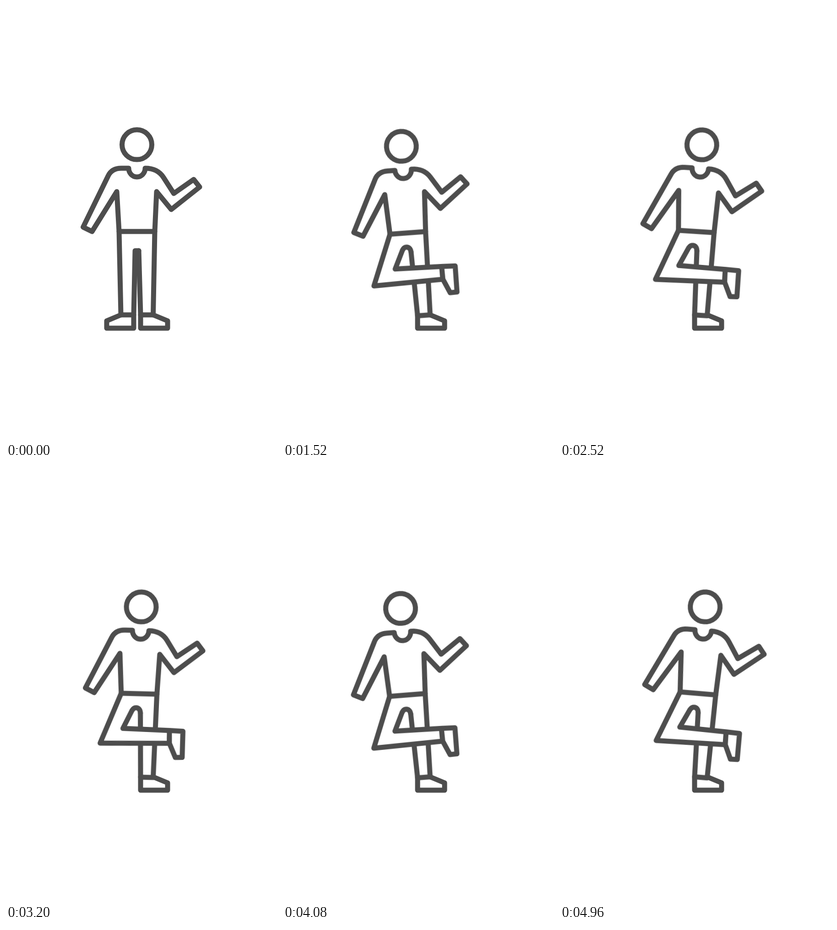
These frames come from a looping animation (592 by 947 pixels, 5 s). An HTML page:

```html
<!DOCTYPE html>
<html lang="en">
<head>
<meta charset="utf-8">
<title>Balance exercise</title>
<style>
  html, body { margin: 0; width: 100%; height: 100%; overflow: hidden; background: #fff; }
  svg { display: block; width: 592px; height: 947px; }
  .line { fill: none; stroke: #4d4d4d; stroke-width: 11; stroke-linecap: round; stroke-linejoin: round; }
  .solid { fill: #fff; }

  .drop, .stand, .lift { animation: 5s step-end infinite; }
  .drop { animation-name: drop; }
  .stand { animation-name: stand; }
  .lift { animation-name: lift; }

  /* the body rocks about the ankle of the standing leg */
  .sway {
    transform-origin: 307.5px 674px;
    animation: sway 5s cubic-bezier(.32, 0, 0, 1) infinite;
  }

  @keyframes sway {
    0%, 20% { transform: rotate(0deg); }
    40%, 80% { transform: rotate(-4.8deg); }
    60%, 100% { transform: rotate(4.8deg); }
  }
  @keyframes drop {
    0% { transform: translateY(0); }
    20%, 100% { transform: translateY(1px); }
  }
  @keyframes stand {
    0% { visibility: visible; }
    20%, 100% { visibility: hidden; }
  }
  @keyframes lift {
    0% { visibility: hidden; }
    20%, 100% { visibility: visible; }
  }
</style>
</head>
<body>
<svg viewBox="0 0 592 947">
  <g class="line">
    <path d="M294 674V703H353V687L321.5 674"/>
    <g class="drop">
      <g class="sway">
        <path d="M325 492L321.5 674H294L290 534"/>
        <g class="stand">
          <path d="M247 492L251 674H279L282 534H290"/>
          <path d="M251 674L220 687V703H279V674"/>
        </g>
        <g class="lift">
          <path class="solid" d="M247 492L203.7 602L355 598.5L354.3 570.5L252.7 568.6L271.5 529Q275 522.7 280.3 522.7C286 522.7 289.6 527 290 534"/>
          <path class="solid" d="M354.3 570.5L383.9 571.6L383.7 628.6L368.7 629L355 598.5Z"/>
        </g>
        <!-- shirt and arms -->
        <path d="M268 354H252C238 354 228 360 223 371L168.5 482.5L188 492L242 405L247 492H325L329 405L361 444L423 395L410 378.5L366.5 409L344 374C335 360 322 354 304 354A18 19 0 0 1 268 354Z"/>
        <circle cx="286" cy="302.6" r="32.5"/>
      </g>
    </g>
  </g>
</svg>
</body>
</html>
```
